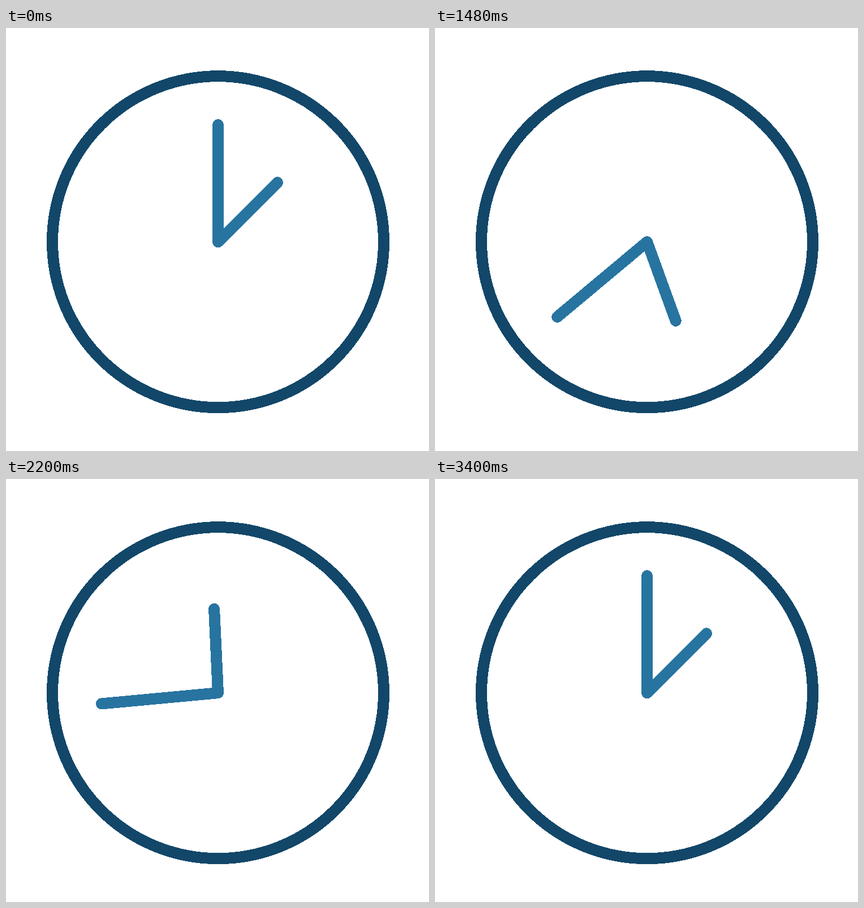
Recreate the animation shown at these times as an HTML page. Size 748 px wide and 748 px high, loop 3430 ms.

```html
<!DOCTYPE html>
<html lang="en">
<head>
<meta charset="utf-8">
<title>Clock</title>
<style>
  html, body { margin: 0; width: 100%; height: 100%; overflow: hidden; background: #fff; }
  svg { display: block; width: 748px; height: 748px; }
  circle, line { fill: none; stroke-width: 20; stroke-linecap: round; shape-rendering: crispEdges; }
  circle { stroke: #124769; }
  line { stroke: #2874a0; }
</style>
</head>
<body>
<svg viewBox="0 0 748 748">
  <g transform="translate(375 378.2)">
    <circle r="293"/>
    <line id="hour" y2="-148.5" transform="rotate(45)"/>
    <line id="minute" y2="-207"/>
  </g>
</svg>
<script>
  const LOOP = 3430, HOLD = 1000, SPIN = 2400, STEP = 30;
  const hour = document.getElementById('hour');
  const minute = document.getElementById('minute');

  // cubic-bezier(1/3, 0, 0, 1), solved by bisection
  function ease(x) {
    if (x <= 0) return 0;
    if (x >= 1) return 1;
    let lo = 0, hi = 1;
    for (let i = 0; i < 30; i++) {
      const s = (lo + hi) / 2;
      if (s - 2 * s * s + 2 * s * s * s < x) lo = s; else hi = s;
    }
    return lo * lo * (3 - 2 * lo);
  }

  function turn(hand, angle) {
    hand.setAttribute('transform', `rotate(${angle.toFixed(3)})`);
  }

  const start = performance.now();

  function draw(now) {
    const t = Math.max(0, now - start) % LOOP;
    const elapsed = Math.floor((t - HOLD) / STEP) * STEP;
    const p = ease(elapsed / SPIN);
    turn(hour, 45 + 360 * p);
    turn(minute, 720 * p);
    requestAnimationFrame(draw);
  }

  requestAnimationFrame(draw);
</script>
</body>
</html>
```
